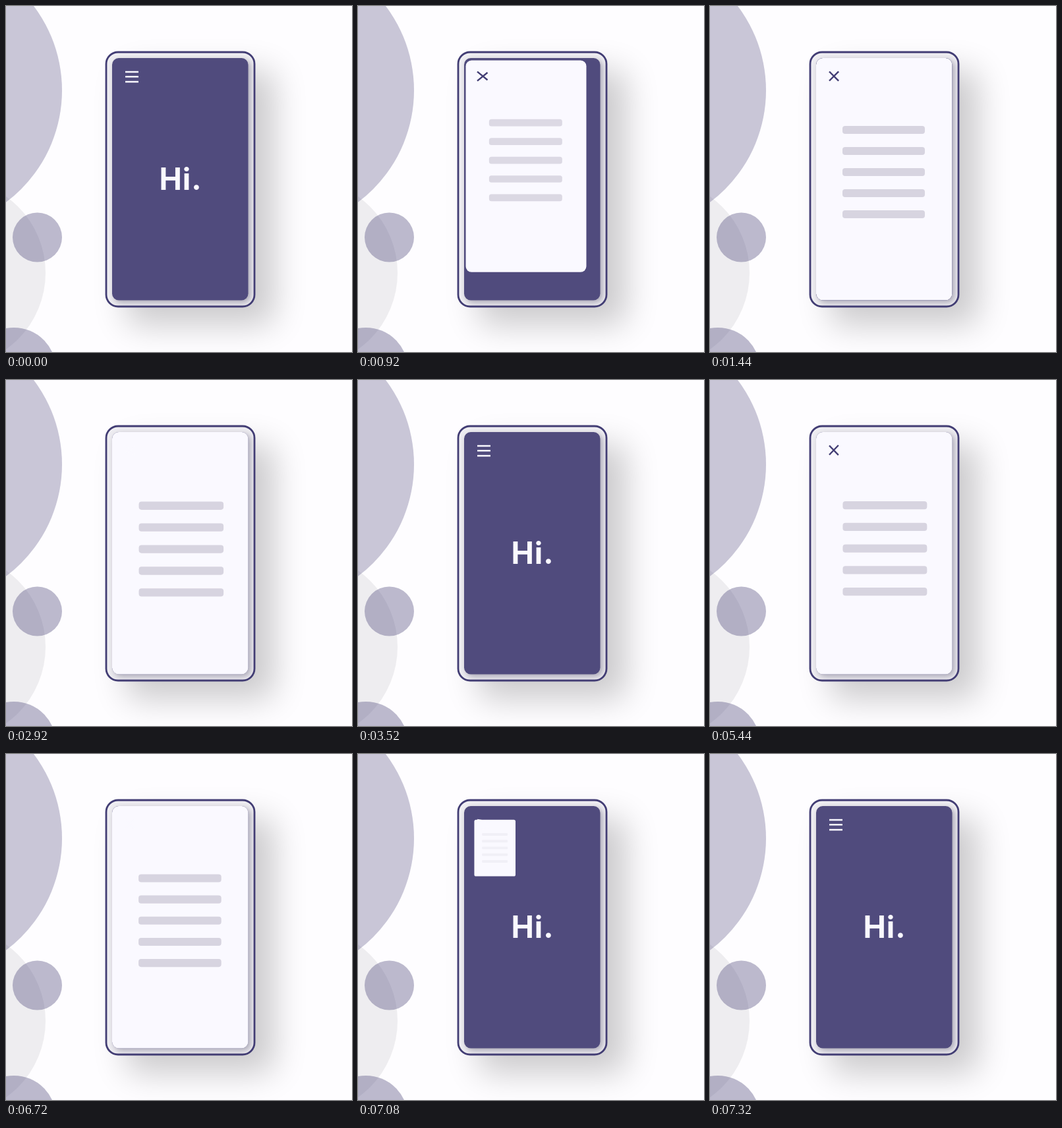
Recreate the animation shown at these times as an HTML page. Size 525 by 525 pixels, loop 7.36 s.

```html
<!DOCTYPE html>
<html lang="en">
<head>
<meta charset="utf-8">
<title>Menu transition</title>
<style>
  html, body { margin: 0; height: 100%; overflow: hidden; background: #fefdff; }
  svg { display: block; width: 100vw; height: 100vh; }
  text { font: 700 46px Inter, sans-serif; letter-spacing: 1px; }
</style>
</head>
<body>
<svg viewBox="0 0 525 525">
  <defs>
    <filter id="blur" x="-50%" y="-50%" width="200%" height="200%"><feGaussianBlur stdDeviation="25"/></filter>
    <filter id="soft" x="-20%" y="-20%" width="140%" height="140%"><feGaussianBlur stdDeviation="5"/></filter>
    <clipPath id="body"><rect x="152" y="70" width="225" height="386" rx="18"/></clipPath>
    <clipPath id="screen"><rect x="161" y="79" width="206.500" height="367.500" rx="10"/></clipPath>
  </defs>

  <circle cx="-82" cy="405" r="142" fill="#eeedf0"/>
  <g fill="#504b7d">
    <circle cx="-127" cy="128" r="212" opacity=".31"/>
    <circle cx="47.500" cy="351" r="37.500" opacity=".38"/>
    <circle cx="12" cy="552" r="64" opacity=".38"/>
  </g>

  <rect x="182" y="98" width="225" height="386" rx="18" opacity=".2" filter="url(#blur)"/>
  <g clip-path="url(#body)">
    <rect x="152" y="70" width="225" height="386" fill="#efeef2"/>
    <rect x="164" y="82" width="207" height="368" rx="10" fill="#3c3858" opacity=".4" filter="url(#soft)"/>
  </g>
  <rect x="152" y="70" width="225" height="386" rx="18" fill="none" stroke="#423d74" stroke-width="2.800"/>

  <g clip-path="url(#screen)">
    <rect x="161" y="79" width="207" height="368" fill="#504b7d"/>
    <text x="232.500" y="279" fill="#faf9ff">Hi.</text>
    <rect id="panel" fill="#faf9ff"/>
    <g id="lines" fill="#d7d4e0"></g>
    <g id="bars" stroke-width="2.400">
      <line x1="181" x2="201"/>
      <line x1="181" x2="201"/>
    </g>
  </g>
</svg>
<script>
const LOOP = 7360, CLOSE_TIME = 600;
const cycles = [[681.5, 2882], [5046.5, 6715]];   // [open, close] start times
const WHITE = '#faf9ff', DARK = '#423d74';

const panel = document.getElementById('panel');
const lines = document.getElementById('lines');
const bars = document.getElementById('bars');
for (let i = 0; i < 5; i++)
  lines.append(document.createElementNS('http://www.w3.org/2000/svg', 'rect'));

const mix = (a, b, p) => a + (b - a) * p;

// Slightly underdamped spring from 0 to 1
function spring(ms) {
  const t = ms / 1000, w = 11.1, zeta = 0.75;
  const decay = w * zeta, wd = w * Math.sqrt(1 - zeta * zeta);
  return 1 - Math.exp(-decay * t) * (Math.cos(wd * t) + decay / wd * Math.sin(wd * t));
}

const bezier = (a, b, s) => 3 * a * s * (1 - s) ** 2 + 3 * b * s * s * (1 - s) + s ** 3;

function easeInOutBack(x) {
  let lo = 0, hi = 1;
  for (let i = 0; i < 24; i++) {
    const mid = (lo + hi) / 2;
    if (bezier(0.7, 0.4, mid) < x) lo = mid; else hi = mid;
  }
  return bezier(-0.4, 1.4, lo);
}

function menuState(t) {
  for (const [open, close] of cycles) {
    if (t >= open && t < close) return { p: t - open > 760 ? 1 : spring(t - open), open: true };
    if (t >= close && t < close + CLOSE_TIME)
      return { p: 1 - easeInOutBack((t - close) / CLOSE_TIME), open: false };
  }
  return { p: 0, open: false };
}

function setBox(el, left, top, right, bottom, radius) {
  const box = {
    x: left, y: top, rx: Math.max(0, radius),
    width: Math.max(0, right - left), height: Math.max(0, bottom - top)
  };
  for (const key in box) el.setAttribute(key, box[key]);
}

function draw(t) {
  const { p, open } = menuState(t);

  // The middle bar of the icon grows into the panel
  setBox(panel, mix(181, 161, p), mix(106, 79, p), mix(201, 367.5, p), mix(108.4, 446.5, p), mix(0.5, 10, p));

  lines.setAttribute('opacity', Math.min(1, Math.max(0, p)));
  [...lines.children].forEach((line, i) => {
    const y = mix(102.5 + 3.8 * i, 188 + 32 * i, p), half = mix(0.9, 6, p);
    setBox(line, mix(184.2, 201, p), y - half, mix(198, 326, p), y + half, mix(0.5, 4, p));
  });

  bars.setAttribute('stroke', open ? DARK : WHITE);
  [...bars.children].forEach((bar, i) => {
    const y = i ? mix(115, 113.5, p) : mix(100, 99.5, p);
    bar.setAttribute('y1', y);
    bar.setAttribute('y2', y);
    bar.setAttribute('transform', `rotate(${(i ? -45 : 45) * p} 181 ${y})`);
  });
}

function tick() {
  draw(performance.now() % LOOP);
  requestAnimationFrame(tick);
}
tick();
</script>
</body>
</html>
```
